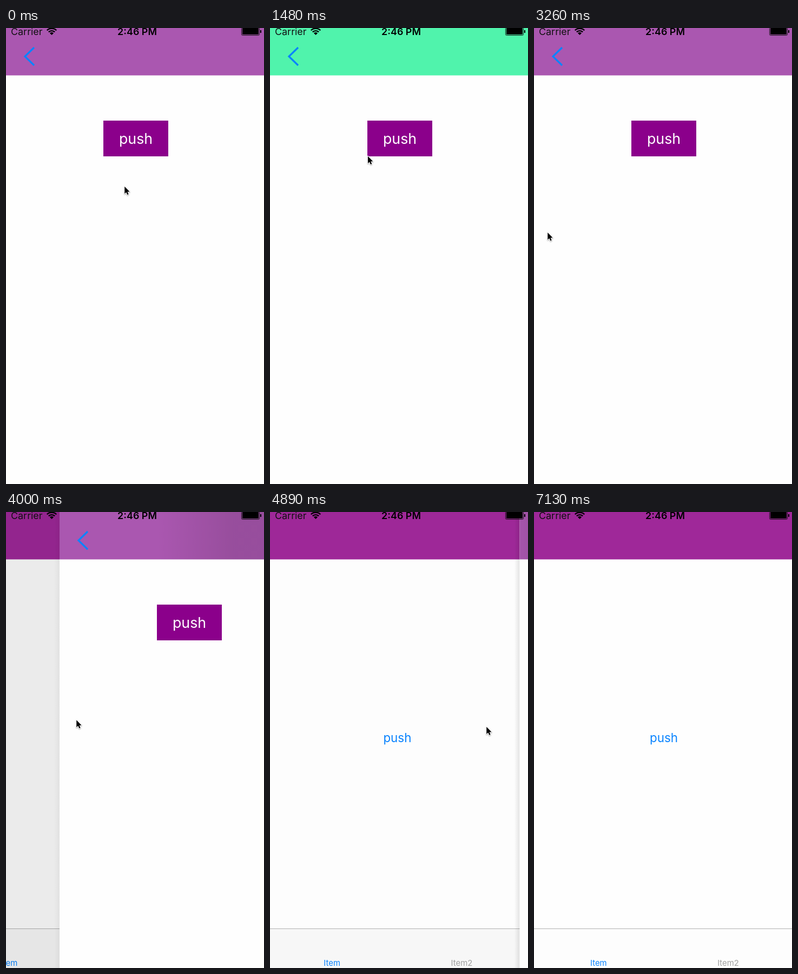
These frames come from a looping animation (477 px wide and 842 px high, 7.76 s). An HTML page with a canvas:

```html
<!DOCTYPE html>
<html lang="en">
<head>
<meta charset="utf-8">
<title>Navigation transitions</title>
<style>
html, body { margin: 0; width: 100%; height: 100%; overflow: hidden; background: #fefefe; }
canvas { display: block; width: 477px; height: 842px; }
</style>
</head>
<body>
<canvas id="stage"></canvas>
<script>
const W = 477, H = 842, LOOP = 7760, BAR = 87.5;
const STEP = 148.5; // the screen refreshes in steps of this many ms
const BLUE = '#0a84ff', FONT = 'Inter, "Liberation Sans", sans-serif';
const canvas = document.getElementById('stage');
const dpr = window.devicePixelRatio || 1;
canvas.width = W * dpr;
canvas.height = H * dpr;
const ctx = canvas.getContext('2d');

// [step, x, y]
const pointer = [
  [0, 219, 292], [1, 220, 268], [2, 220, 232], [3, 220, 220], [6, 220, 220],
  [7, 217, 246], [8, 214, 277], [9, 205, 268], [12, 132, 172], [14, 62, 90],
  [15, 43, 68], [16, 40, 64], [18, 38, 68], [20, 30, 230], [22, 25, 377],
  [23, 21, 378], [24, 29, 378], [26, 82, 381], [28, 178, 386], [30, 287, 392],
  [31, 385, 396], [32, 400, 396], [36, 400, 396], [37, 385, 401], [38, 345, 410],
  [39, 305, 415], [40, 262, 418], [41, 238, 418], [44, 238, 418],
  [45, 300, 565], [46, 387, 713], [47, 434, 785]
];

function pointerAt(n) {
  const last = pointer[pointer.length - 1];
  if (n > last[0]) return null;
  const i = Math.max(1, pointer.findIndex(k => k[0] >= n));
  const [n0, x0, y0] = pointer[i - 1], [n1, x1, y1] = pointer[i];
  const k = (n - n0) / (n1 - n0);
  return [x0 + (x1 - x0) * k, y0 + (y1 - y0) * k];
}

// Critically damped spring: share of the way still to go
function rest(steps) {
  const s = Math.max(0, steps) * STEP * 0.012;
  const r = (1 + s) * Math.exp(-s);
  return r < 0.004 ? 0 : r;
}

function rect(x, y, w, h, fill) {
  ctx.fillStyle = fill;
  ctx.fillRect(x, y, w, h);
}

function label(str, x, y, size, fill, align = 'center', weight = 400) {
  ctx.font = `${weight} ${size}px ${FONT}`;
  ctx.textAlign = align;
  ctx.fillStyle = fill;
  ctx.fillText(str, x, y);
}

function detail(color, moving, pressed) {
  rect(0, 0, W, H, '#fefefe');
  rect(0, 0, W, BAR, color);
  if (moving > 0) {
    const g = ctx.createLinearGradient(235 - moving * 0.55, 0, 395 - moving * 0.75, 0);
    g.addColorStop(0, 'rgba(0,0,0,0)');
    g.addColorStop(1, 'rgba(0,0,0,.11)');
    rect(0, 0, W, BAR, g);
  }
  ctx.globalAlpha = pressed ? 0.2 : 1;
  ctx.strokeStyle = BLUE;
  ctx.lineWidth = 3.3;
  ctx.beginPath();
  ctx.moveTo(52, 36);
  ctx.lineTo(35, 52.5);
  ctx.lineTo(52, 69);
  ctx.stroke();
  ctx.globalAlpha = 1;
  rect(180, 171, 120, 66, '#8b008b');
  label('push', 240, 214, 26.8, '#fff');
}

function root(moving) {
  rect(0, 0, W, H, '#fefefe');
  rect(0, 0, W, BAR, '#9f2899');
  label('push', 240, 425, 22.4, BLUE);
  rect(0, 769, W, 73, moving ? '#f8f8f8' : '#fdfdfd');
  rect(0, 769, W, 1, '#b0b0b0');
  label('Item', 119.3, 838, 14.9, BLUE);
  label('Item2', 359, 838, 14.9, '#a0a0a0');
}

const purple = (moving, pressed) => detail('#aa57b0', moving, pressed);
const green = (moving, pressed) => detail('#50f3ac', moving, pressed);

// The lower page trails behind at 30 % speed under a fading dim
function slide(lower, upper, x) {
  const left = 1 - x / W;
  if (x > 0) {
    ctx.save();
    ctx.translate(-0.3 * W * left, 0);
    lower(1);
    ctx.restore();
    rect(0, 0, x, H, `rgba(0,0,0,${0.095 * left})`);
    const g = ctx.createLinearGradient(x - 10, 0, x, 0);
    g.addColorStop(0, 'rgba(0,0,0,0)');
    g.addColorStop(1, `rgba(0,0,0,${0.2 * Math.min(x / W, 0.5)})`);
    rect(x - 10, 0, 10, H, g);
  }
  ctx.save();
  ctx.translate(x, 0);
  upper(x);
  ctx.restore();
}

function pages(n) {
  if (n < 4) purple(0);
  else if (n < 9) slide(() => purple(0), green, W * rest(n - 3.1));
  else if (n < 18) green(0, n === 16);
  else if (n < 22) slide(() => purple(0), green, W * (1 - rest(n - 17)));
  else if (n < 24) purple(0);
  else if (n < 32) slide(root, purple, Math.max(0, pointerAt(n)[0] - 31));
  else if (n < 35) slide(root, purple, W - 123 * Math.pow((35 - n) / 4, 3));
  else root(0);
}

function statusBar() {
  label('Carrier', 9, 13, 17.9, '#111', 'left');
  label('2:46 PM', 242.5, 13, 17.9, '#000', 'center', 600);

  ctx.save();
  ctx.beginPath();
  ctx.moveTo(84.5, 13);
  ctx.arc(84.5, 13, 16, -Math.PI * 0.75, -Math.PI * 0.25);
  ctx.clip();
  ctx.strokeStyle = '#000';
  ctx.lineWidth = 2.4;
  for (const r of [12.3, 7.9]) {
    ctx.beginPath();
    ctx.arc(84.5, 13, r, 0, Math.PI * 2);
    ctx.stroke();
  }
  ctx.fillStyle = '#000';
  ctx.beginPath();
  ctx.arc(84.5, 13, 5, 0, Math.PI * 2);
  ctx.fill();
  ctx.restore();

  ctx.strokeStyle = '#111';
  ctx.lineWidth = 1;
  ctx.beginPath();
  ctx.roundRect(435.5, -1.5, 33, 15, 2);
  ctx.stroke();
  rect(437, 0, 30, 12, '#000');
  rect(470, 4, 2, 5, '#000');
}

function arrow([x, y]) {
  ctx.save();
  ctx.translate(x, y);
  ctx.beginPath();
  ctx.moveTo(0.3, 0.8);
  ctx.lineTo(0.3, 14);
  ctx.lineTo(3.3, 11.2);
  ctx.lineTo(5.4, 16);
  ctx.lineTo(7.6, 15.1);
  ctx.lineTo(5.6, 10.4);
  ctx.lineTo(9.6, 10.2);
  ctx.closePath();
  ctx.lineJoin = 'round';
  ctx.lineWidth = 2;
  ctx.strokeStyle = '#fff';
  ctx.shadowColor = 'rgba(0,0,0,.35)';
  ctx.shadowBlur = 2 * dpr;
  ctx.shadowOffsetY = dpr;
  ctx.stroke();
  ctx.shadowColor = 'transparent';
  ctx.fillStyle = '#000';
  ctx.fill();
  ctx.restore();
}

function draw(time) {
  const n = Math.floor((time % LOOP + 12) / STEP);
  ctx.setTransform(dpr, 0, 0, dpr, 0, 0);
  pages(n);
  statusBar();
  const tip = pointerAt(n);
  if (tip) arrow(tip);
}

let start;
function tick(now) {
  if (start === undefined) start = now;
  draw(now - start);
  requestAnimationFrame(tick);
}
draw(0);
requestAnimationFrame(tick);
</script>
</body>
</html>
```
